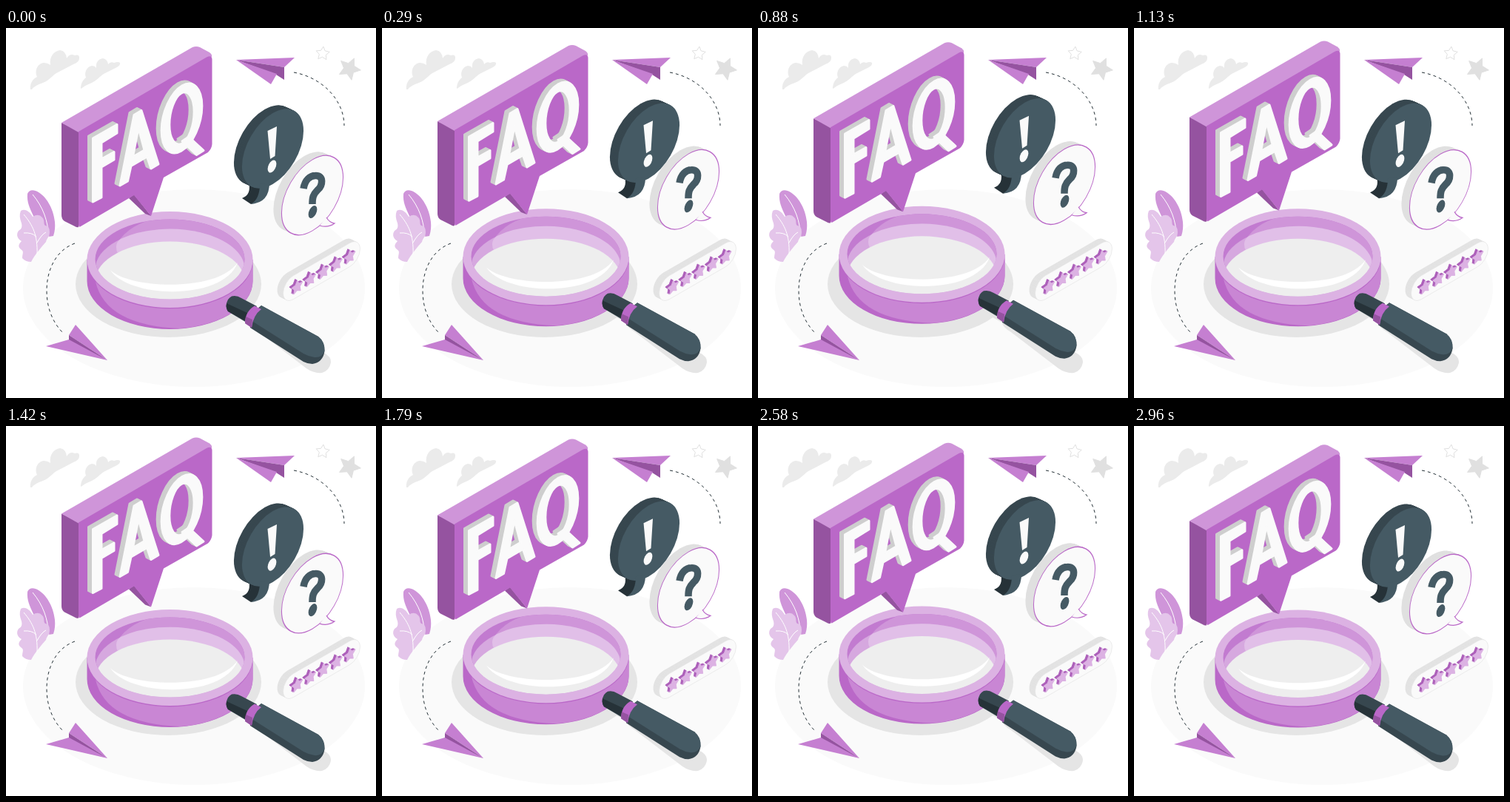
Animation, 500 px wide and 500 px high, one loop 3 s. Source, as an HTML page:

```html
<!DOCTYPE html>
<html lang="en">
<head>
<meta charset="utf-8">
<title>FAQ</title>
<style>
html, body { margin: 0; width: 100%; height: 100%; overflow: hidden; background: #fff; }
svg { display: block; width: 100%; height: 100%; }
</style>
</head>
<body>
<svg id="stage" viewBox="0 0 500 500" role="img" aria-label="FAQ"></svg>
<script>
const PURPLE = '#ba68c8', SHADE = '#9553a0', TINT = '#cf95d9', SLATE = '#455a64', DEEP = '#37474f', INK = '#263238';

const path = (d, fill = '', more = '') => `<path d="${d}" ${fill && `fill="${fill}"`} ${more}/>`;
const poly = (points, fill) => `<polygon points="${points}" fill="${fill}"/>`;
const oval = (x, y, rx, ry, fill = '', more = '') =>
  `<ellipse cx="${x}" cy="${y}" rx="${rx}" ry="${ry}" ${fill && `fill="${fill}"`} ${more}/>`;

// Places a shape drawn around 0,0 on the isometric wall.
const wall = (x, y, shape) => `<g transform="matrix(.866 -.5 0 1 ${x} ${y})">${shape}</g>`;

// Stacks copies of a shape from its back to its front.
function extrude(shape, dx, dy, side, face) {
  const n = Math.ceil(-dx);
  let out = '';
  for (let i = n; i; i--)
    out += `<g transform="translate(${dx * i / n} ${dy * i / n})" fill="${side}" stroke="${side}">${shape}</g>`;
  return out + `<g fill="${face}" stroke="${face}">${shape}</g>`;
}

function star(r, inner, turn) {
  const points = Array.from({ length: 10 }, (_, i) => {
    const a = (turn + i * 36) * Math.PI / 180, d = i % 2 ? inner : r;
    return (d * Math.cos(a)).toFixed(2) + ',' + (d * Math.sin(a)).toFixed(2);
  });
  return `<polygon points="${points.join(' ')}" stroke-linejoin="round"/>`;
}

const dashes = d => path(d, 'none', `stroke="${INK}" stroke-width="1" stroke-dasharray="4 4"`);

const scenery =
  oval(254, 351.5, 231, 133.5, '#fafafa') +
  path('M33 83C32 75 36 69 42 66C38 57 43 48 51 47Q56 47 60 50C58 39 65 31 73 30Q81 31 82 41Q86 34 93 37Q99 35 99 40C99 45 96 47 91 49L70 60C62 64 60 70 50 74Q38 78 35 83Z', '#ebebeb') +
  path('M101 82C101 75 104 70 108 67C105 59 110 52 116 51Q120 51 122 54C121 46 125 42 131 41Q137 42 138 49Q141 45 146 47Q152 45 154 47Q155 50 150 53L132 62C126 66 124 70 116 74Q106 78 103 81Z', '#ebebeb') +
  `<g transform="translate(428 34.5)" fill="none" stroke="#e0e0e0">${star(9.5, 4.8, -85)}</g>` +
  `<g transform="translate(464 55)" fill="#e0e0e0" stroke="#e0e0e0">${star(15.5, 7.5, 79)}</g>` +
  oval(219.5, 346, 125.5, 72, '#e5e5e5') +
  path('M300 373L330 375L428 438Q440 444 439 452Q437 463 427 466Q416 467 406 460L342 411Q330 404 330 398L300 382Z', '#e5e5e5');

const leaves =
  path('M29 224C31 218 38 218 44 222C54 228 64 243 66 262Q67 272 64 281L46 284C46 260 27 246 29 224Z', TINT) +
  path('M36 225C50 242 57 260 58 285', 'none', 'stroke="#fff"') +
  path('M20 247C26 243 33 249 36 255Q44 250 49 256C53 260 50 265 53 267Q59 267 59 276C59 282 55 284 54 289C48 296 39 306 34 316Q26 316 22 311C22 305 25 302 20 299C15 295 18 291 21 288C14 284 14 278 17 274Q23 271 21 264Q17 254 20 247Z', '#e4c5ea') +
  path('M24 252C36 266 43 280 42 306M24 277Q35 276 41 282M42 290Q48 279 54 276', 'none', 'stroke="#fff"');

const planes =
  dashes('M389 60C428 67 457 98 457 132') +
  dashes('M93 291C68 300 55 326 55 355C55 378 63 398 77 412') +
  poly('311,43 390,40 376,53', '#c57fd1') +
  poly('311,43 376,53 376,70 365,63', SHADE) +
  poly('311,43 366,62 358,76', '#c57fd1') +
  poly('94,401 137,449 85,415', '#c57fd1') +
  poly('85,415 137,449 85,424', SHADE) +
  poly('54,430 85,421 137,449', '#c57fd1');

const magnifier =
  path('M109.5 313V342A112 65 0 0 0 333.5 342V313Z', PURPLE) +
  path('M121 343A112 65 0 0 0 333.5 313V342A112 65 0 0 1 235 406Q135 402 121 343Z', '#c986d4') +
  oval(221.5, 313, 112, 65, '#dcb2e3') +
  '<clipPath id="hole">' + oval(221.5, 312.5, 101, 54) + '</clipPath><g clip-path="url(#hole)">' +
  path('M120 255H325V370H120Z', '#c27bd0') +
  path('M208 256Q160 266 147 298L240 340H325V255Z', TINT) +
  oval(221.5, 326, 101, 54, '#d6a8df') +
  path('M149 296Q149 289 155 285A101 54 0 0 1 322.5 325V350L151 304Q149 301 149 296Z', '#e1bfe8') +
  oval(221.5, 342, 101, 53.5, '#eee') +
  path('M141 327C165 352 285 358 313 317C294 369 166 366 141 327Z', '#fff') + '</g>' +
  path('M305 362.5Q312 361 318 365L339 376L325 398L300 383Q295 376 300 367Q302 364 305 362.5Z', DEEP) +
  path('M298 372L326 385L324 396L300 383Q297 379 298 372Z', INK) +
  path('M345 375L422 417Q431 424 430.5 437Q428 452 414 454Q408 454 402 451L330 405Q328 387 345 375Z', DEEP) +
  path('M345 375L422 417Q431 424 430.5 436Q427 446 417 445Q409 444 402 440L334 397Q335 384 345 375Z', SLATE) +
  path('M336 375.5L345 380Q334 388 332 405L323 399Q323 383 336 375.5Z', PURPLE) +
  path('M324 390L333 394L332 405L323 399Z', SHADE);

const letters =
  '<g stroke-width="3" stroke-linejoin="round" fill-rule="evenodd">' +
  path('M117.5 149L150 130.5V142L129 155V177L146 167.5V178L129 188V229L117.5 235Z') +
  path('M154 213L173 117.5L183 111.5L206 184L196 190L190.5 174L169 186.5L164.5 207ZM171.5 174L179 135L187 165Z') +
  wall(237.5, 122, path('M-31.8 0A31.8 44 0 0 1 31.8 0A31.8 44 0 0 1-31.8 0ZM-19 0A19 34 0 0 0 19 0A19 34 0 0 0-19 0Z')) +
  path('M238 153L247 147L267 165.5L257.5 171.5Z') + '</g>';

const board =
  path('M166 230L173 225L196 254L188 251Z', SHADE) +
  path('M75 128L98 139V269Q96 270 93 268L79 261Q75 258 75 253Z', SHADE) +
  path('M75 128L252 26Q257 24 262 26L275 33Q279 36 278 39L98 141Z', TINT) +
  path('M98 140L271 39.5Q278 36 278.5 42V157Q278 163 273 168L213 202L196 254L173 226L101 268Q98 270 98 266Z', PURPLE) +
  extrude(letters, -6, -3, '#cecece', '#fafafa');

const disc = (x, y, look) => wall(x, y, oval(0, 0, 48, 48, '', look));
const dot = (x, y, fill) => wall(x, y, oval(0, 0, 6.8, 7.8, fill));
const outline = `stroke="${PURPLE}" stroke-width="1.2"`;

const bubbles =
  path('M328 208Q332 224 319 229L331 237Q348 232 348 210Z', INK) +
  extrude(disc(360.5, 162, 'stroke="none"'), -11, -5, DEEP, SLATE) +
  path('M356 208Q356 235 331 237Q343 230 343 210Z', SLATE) +
  path('M353.5 138L366 132L363.5 172L357 176Z', '#fafafa') +
  dot(359.5, 186, '#fafafa') +
  extrude(disc(414, 225, 'stroke="none"'), -11, -5, '#e0e0e0', '#fafafa') +
  disc(414, 225, 'fill="none" ' + outline) +
  path('M433 255Q437 262 444 263Q435 269.5 424 266', '#fafafa', outline) +
  path('M402 216C404 204 411 198.5 418 198.5C430 198 428 212 421 218C415 224 414 228 414 237', 'none', `stroke="${SLATE}" stroke-width="9.5"`) +
  dot(414.5, 247.5, SLATE);

const pill = look => wall(426.5, 328.5, `<rect x="-60" y="-16" width="120" height="32" rx="16" ${look}/>`);
const rating =
  extrude(pill('stroke="none"'), -8, -4, '#e3e3e3', '#fafafa') +
  pill('fill="none" stroke="#e5e5e5" stroke-width=".7"') +
  Array.from({ length: 5 }, (_, i) =>
    extrude(wall(393.5 + 17.8 * i, 350 - 10.2 * i, star(9, 4.6, -90)), -3, -1.5, '#ad60ba', '#dcb2e3')).join('');

document.getElementById('stage').innerHTML =
  scenery + leaves +
  `<g id="magnifier">${magnifier}</g><g id="board">${board}</g>` +
  `<g id="bubbles"><g transform="translate(0 1)">${bubbles}</g></g>` +
  rating + planes;

// Linear rise and fall between 0 and 1.
const LEAD = 42;
const wave = (t, period) => 1 - Math.abs(1 - 2 * ((t + LEAD) / period % 1));

const floats = [['board', 10, 3000], ['magnifier', 10, 1500], ['bubbles', 20, 1500]]
  .map(([id, height, period]) => ({ node: document.getElementById(id), height, period }));

let start;
function draw(now) {
  start ??= now;
  const t = (now - start) % 3000;
  for (const { node, height, period } of floats) {
    const y = height * (wave(0, period) - wave(t, period));
    node.setAttribute('transform', `translate(0 ${y.toFixed(3)})`);
  }
  requestAnimationFrame(draw);
}
requestAnimationFrame(draw);
</script>
</body>
</html>
```
